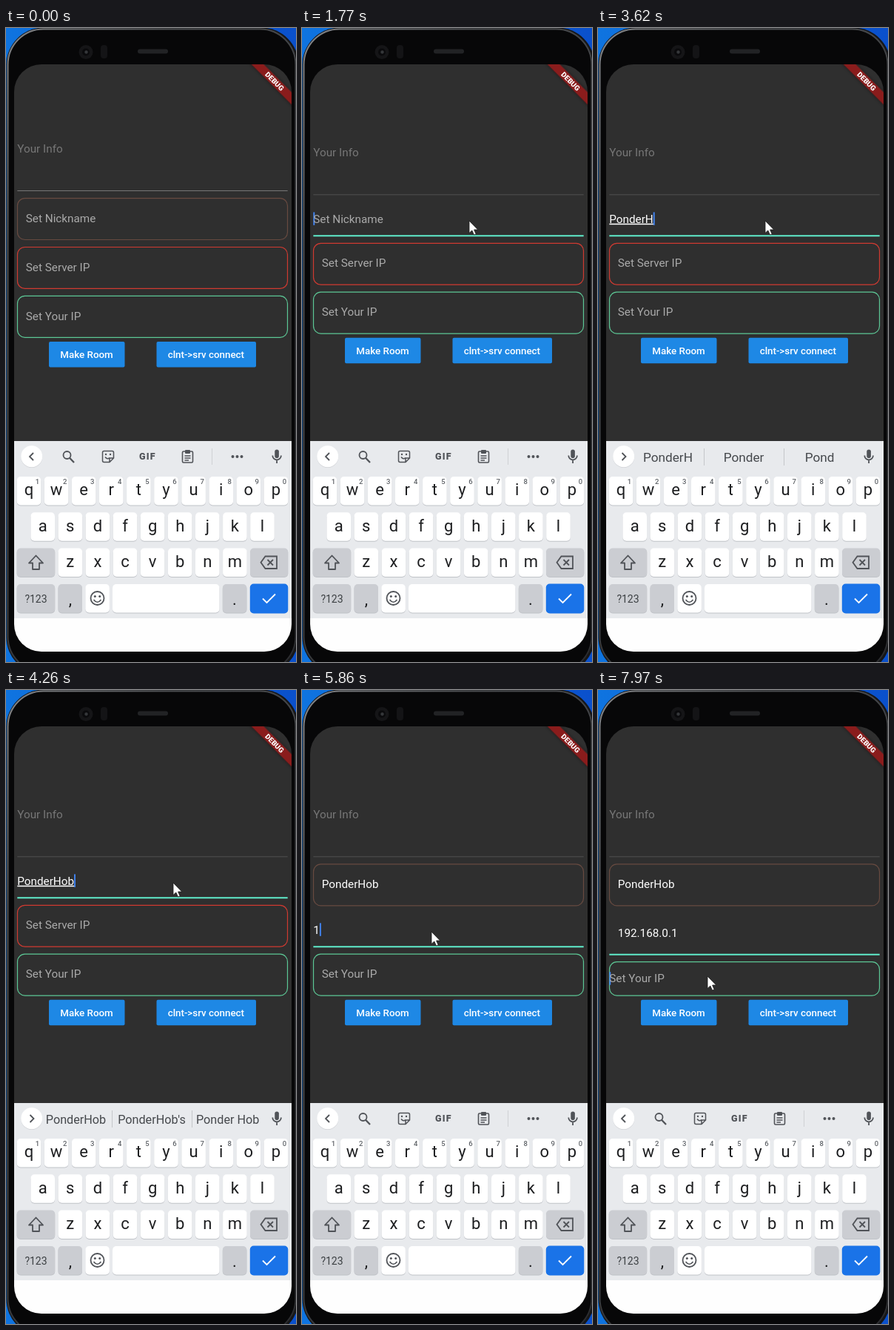
An HTML page that plays this animation: 392x855 px, repeating every 8000 ms.

```html
<!DOCTYPE html>
<html lang="en">
<head>
<meta charset="utf-8">
<title>Room setup</title>
<style>
html, body { margin: 0; width: 100%; height: 100%; overflow: hidden; background: #0b62d6; }
svg { display: block; font-family: Roboto, sans-serif; }
.form { font-size: 15.27px; }
.btn { font-size: 13.36px; font-weight: 500; fill: #fff; }
.key { font-size: 22px; fill: #1d1e20; text-anchor: middle; }
.digit { font-size: 9.5px; font-weight: 500; fill: #5f6368; text-anchor: middle; }
.word { fill: #46494d; text-anchor: middle; }
.icon { fill: none; stroke: #505358; stroke-width: 1.8; }
.solid { fill: #505358; stroke: none; }
</style>
</head>
<body>
<svg width="392" height="855" viewBox="0 0 392 855">
  <defs>
    <clipPath id="screen"><rect x="11" y="49" width="375" height="792" rx="37"/></clipPath>
    <filter id="shade" x="-20%" y="-100%" width="140%" height="300%">
      <feDropShadow dx="0" dy="0" stdDeviation="2.4" flood-opacity=".5"/>
    </filter>
    <linearGradient id="wall">
      <stop stop-color="#0f74e0"/><stop offset="1" stop-color="#0a50cc"/>
    </linearGradient>
    <linearGradient id="rim" x2=".6" y2="1">
      <stop stop-color="#85878a"/><stop offset=".25" stop-color="#4c4e51"/><stop offset="1" stop-color="#2c2d30"/>
    </linearGradient>
  </defs>

  <rect width="392" height="855" fill="url(#wall)"/>
  <rect x=".5" y="-.5" width="395" height="872" rx="50" fill="#161719"/>
  <rect x="2.5" y="1.5" width="389" height="867" rx="48" fill="#070708" stroke="url(#rim)" stroke-width="2"/>
  <circle cx="108" cy="32.5" r="9.5" fill="#151517"/>
  <circle cx="108" cy="32.5" r="5" fill="#0a0a0c"/>
  <circle cx="108.5" cy="32.5" r="2.2" fill="#35373a"/>
  <rect x="128" y="23" width="9" height="18" rx="4" fill="#141416"/>
  <rect x="178" y="28.5" width="41" height="6" rx="3" fill="#222325"/>

  <g clip-path="url(#screen)">
    <rect x="11" y="49" width="375" height="792" fill="#2f2f2f"/>
    <g transform="translate(386 49) rotate(45)">
      <rect x="-46" y="26.7" width="92" height="11.5" fill="#8a1a1b" filter="url(#shade)"/>
      <text y="35.9" font-size="9.74" font-weight="900" fill="#fff" text-anchor="middle">DEBUG</text>
    </g>

    <g class="form">
      <g id="head">
        <text x="15.3" y="168.2" fill="#777">Your Info</text>
        <path id="rule" d="M15.3 219.5H380.7"/>
      </g>
      <g id="fields"></g>
      <g id="buttons">
        <rect x="58" width="102.5" height="34.5" rx="2" fill="#1e88e5"/>
        <rect x="203.5" width="134.5" height="34.5" rx="2" fill="#1e88e5"/>
        <text class="btn" x="73.3" y="22">Make Room</text>
        <text class="btn" x="218.7" y="22">clnt-&gt;srv connect</text>
      </g>
    </g>

    <rect x="11" y="557" width="375" height="239" fill="#e8eaed"/>
    <rect x="11" y="796" width="375" height="46" fill="#fefefe"/>
    <circle cx="34.7" cy="578.5" r="14.5" fill="#cfd1d5"/>
    <circle cx="34.7" cy="577.7" r="14.5" fill="#fff"/>
    <path id="chevron" class="icon"/>

    <g id="tools" class="icon">
      <circle cx="82.5" cy="576" r="5"/>
      <path d="M86 579.7L92 586" stroke-width="2.3"/>
      <path d="M132.5 570.5H143.5Q145.5 570.5 145.5 572.5V580L140 585.5H132.5Q130.5 585.5 130.5 583.5V572.5Q130.5 570.5 132.5 570.5ZM145.5 580H140V585.5M134 578.5Q137 582.5 140 579.5" stroke-width="1.5"/>
      <circle class="solid" cx="135" cy="575" r="1.2"/>
      <circle class="solid" cx="141" cy="575" r="1.2"/>
      <text class="solid" x="191.5" y="581.8" font-size="12.5" font-weight="900" letter-spacing="1.3" text-anchor="middle">GIF</text>
      <rect x="238.5" y="571" width="14" height="15" rx="1.5" stroke-width="1.6"/>
      <rect class="solid" x="242" y="569" width="7" height="5" rx="1"/>
      <path d="M241.5 577H249.5M241.5 580H249.5M241.5 583H247" stroke-width="1.3"/>
      <path d="M278.5 567V589" stroke="#cfd1d5" stroke-width="1"/>
      <g class="solid">
        <circle cx="306.5" cy="578" r="2"/><circle cx="312.5" cy="578" r="2"/><circle cx="318.5" cy="578" r="2"/>
      </g>
    </g>
    <g id="words">
      <path d="M143.5 567V590M251.5 567V590" stroke="#c4c6ca"/>
      <text class="word" x="94.5" y="584.5"></text>
      <text class="word" x="197" y="584.5"></text>
      <text class="word" x="299.7" y="584.5"></text>
    </g>
    <g class="icon">
      <rect class="solid" x="363.3" y="568.5" width="5.6" height="11.5" rx="2.8"/>
      <path d="M360.3 576.5A5.8 5.8 0 0 0 371.9 576.5M366.1 582.5V587"/>
    </g>

    <g id="keys"></g>
    <text x="40.5" y="774.5" font-size="14" fill="#3c4043" text-anchor="middle">?123</text>
    <g class="icon">
      <path d="M40.5 711.5L31 721.5H36V730H45V721.5H50Z" stroke-linejoin="round"/>
      <path d="M350.5 712.5H366V729H350.5L344.5 720.7ZM353.5 717L361 724.5M361 717L353.5 724.5"/>
      <circle cx="123.5" cy="769" r="9"/>
      <circle class="solid" cx="120.3" cy="766.5" r="1.5"/>
      <circle class="solid" cx="126.7" cy="766.5" r="1.5"/>
      <path d="M118.5 771Q123.5 777.5 128.5 771" stroke-width="1.6"/>
      <path d="M347 769.5L352.5 775L364 763.5" stroke="#fff"/>
    </g>
  </g>
  <path id="mouse" d="M0 0V16.5L3.8 13L6.5 19L9.2 17.9L6.6 12H11.7Z" fill="#fff" stroke="#1a1a1a" stroke-width=".8"/>
</svg>

<script>
const LOOP = 8000, FIELD = 55.9, FOCUSED = 45.4, GAP = 10;
const $ = id => document.getElementById(id);
const set = (el, attrs) => { for (const k in attrs) el.setAttribute(k, attrs[k]); };
const show = (el, on) => set(el, { visibility: on ? 'visible' : 'hidden' });
const count = (times, t) => times.filter(x => x <= t).length;

// Keyboard
const GREY = '#cbcdd2';
const key = (x, y, w, fill = '#fff') =>
  `<rect x="${x}" y="${y + 1}" width="${w}" height="38.5" rx="5" fill="#c0c3c8"/>
   <rect x="${x}" y="${y}" width="${w}" height="38.5" rx="5" fill="${fill}"/>`;
const label = (s, x, y) => `<text class="key" x="${x}" y="${y}">${s}</text>`;
let keys = '';
[['qwertyuiop', 31, 605], ['asdfghjkl', 49.7, 653.3], ['zxcvbnm', 86.8, 701.5]].forEach(([row, x0, y], r) =>
  [...row].forEach((c, i) => {
    const x = x0 + i * 37.1;
    keys += key(x - 16.3, y, 32.6) + label(c, x, y + 25.3);
    if (!r) keys += `<text class="digit" x="${x + 11.5}" y="615.3">${(i + 1) % 10}</text>`;
  }));
keys += key(14.7, 701.5, 51.5, GREY) + key(330, 701.5, 51.3, GREY)
  + key(14.7, 750, 51.5, GREY) + key(70.5, 750, 32.5, GREY) + key(107.3, 750, 32.6)
  + key(144, 750, 144.5) + key(292.8, 750, 32.6, GREY)
  + '<rect x="329.8" y="749.5" width="51.5" height="40" rx="5" fill="#1a73e8"/>'
  + label(',', 87, 778) + label('.', 309, 778);
$('keys').innerHTML = keys;

// Form
const NAME = 'PonderHob', IP = '192.168.0.1';
const nameTimes = [2280, 2390, 2480, 2570, 2670, 3160, 3540, 3800, 3980];
const markTimes = [2350, 2440, 2530, 2630, 2850, 3370, 3600, 3830, 4240];
const wordTimes = [2350, 2440, 2530, 2630, 2880, 3370, 3620, 3830, 4260];
const ipTimes = [5770, 5890, 6010, 6130, 6260, 6380, 6560, 6710, 6880, 6950, 7020];
const focusTimes = [830, 5120, 7940], borderTimes = [860, 5190];
const blinkTimes = [770, ...nameTimes, 4260, 5120, ...ipTimes, 7940];
const words = [
  'P Pm Pro', 'Po Poor Pop', 'Pon Pond Pony', 'Pond Pony Pint', 'Ponde Ponder Pony',
  'Ponder Ponders Pond', 'PonderH Ponder Pond', 'PonderHo Ponder Pond', "PonderHob PonderHob's Ponder_Hob"
].map(s => s.split(' ').map(w => w.replace('_', ' ')));

const fields = [['Set Nickname', '#674a40'], ['Set Server IP', '#cf3a31'], ['Set Your IP', '#5cc795']]
  .map(([hint, color]) => {
    const g = document.createElementNS('http://www.w3.org/2000/svg', 'g');
    g.innerHTML = `<rect x="15.5" width="365" rx="10" fill="none" stroke="${color}" stroke-width="1.2"/>
      <path stroke="#5feccb" stroke-width="2"/><rect y="13.5" width="1.9" height="17.5" fill="#4285f4"/>
      <text><tspan text-decoration="underline"></tspan><tspan></tspan></text>`;
    $('fields').append(g);
    const [box, line, caret, text] = g.children;
    return { g, box, line, caret, text, hint };
  });

function drawForm(t) {
  const focus = count(focusTimes, t) - 1, border = count(borderTimes, t) - 1;
  const shift = focus < 0 ? 0 : 5.3;
  const values = [NAME.slice(0, count(nameTimes, t)), IP.slice(0, count(ipTimes, t)), ''];
  const last = Math.max(...blinkTimes.filter(x => x <= t));
  const blink = Math.floor((t - last) / 500) % 2 === 0;
  let y = 229.6 + shift;
  set($('head'), { transform: `translate(0 ${shift})` });
  set($('rule'), { stroke: focus < 0 ? '#777' : '#505050' });
  fields.forEach((f, i) => {
    const active = i === focus, h = active ? FOCUSED : FIELD, value = values[i];
    set(f.g, { transform: `translate(0 ${y})` });
    set(f.box, { height: h });
    set(f.line, { d: `M15.3 ${h}H380.7` });
    show(f.box, i !== border);
    show(f.line, i === border);
    const marked = active && i === 0 ? count(markTimes, t) : 0;
    const [under, plain] = f.text.children;
    under.textContent = value.slice(0, marked);
    plain.textContent = value ? value.slice(marked) : f.hint;
    set(f.text, { x: active ? 15.3 : 26.8, y: active ? 27.8 : 32.2, fill: value ? '#fff' : '#aaa' });
    set(f.caret, { x: 15.3 + (value ? f.text.getComputedTextLength() : 0) });
    show(f.caret, active && blink);
    y += h + GAP;
  });
  set($('buttons'), { transform: `translate(0 ${y - GAP + 5.7})` });
}

function drawBar(t) {
  const n = t < 5190 ? count(wordTimes, t) : 0;
  show($('tools'), !n);
  show($('words'), n);
  set($('chevron'), { d: n ? 'M32.5 573L37.5 578L32.5 583' : 'M37 573L32 578L37 583' });
  if (n) [...$('words').querySelectorAll('text')].forEach((el, i) => {
    const w = words[n - 1][i];
    el.textContent = w;
    set(el, { 'font-size': w.length > 8 ? 16.2 : 17.2 });
  });
}

// Pointer moves: start, end, x, y
const moves = [[60, 700, 173, 254], [890, 1290, 226, 260], [4700, 5090, 175, 326], [7510, 7930, 148, 386]];
function drawMouse(t) {
  let x = 390, y = 810;
  for (const [a, b, tx, ty] of moves) {
    const p = Math.min(1, Math.max(0, (t - a) / (b - a))), e = p * p * (3 - 2 * p);
    x += (tx - x) * e;
    y += (ty - y) * e;
  }
  set($('mouse'), { transform: `translate(${x} ${y})` });
  show($('mouse'), t >= 60);
}

const start = performance.now();
function frame() {
  const t = (performance.now() - start) % LOOP;
  drawForm(t);
  drawBar(t);
  drawMouse(t);
  requestAnimationFrame(frame);
}
frame();
</script>
</body>
</html>
```
